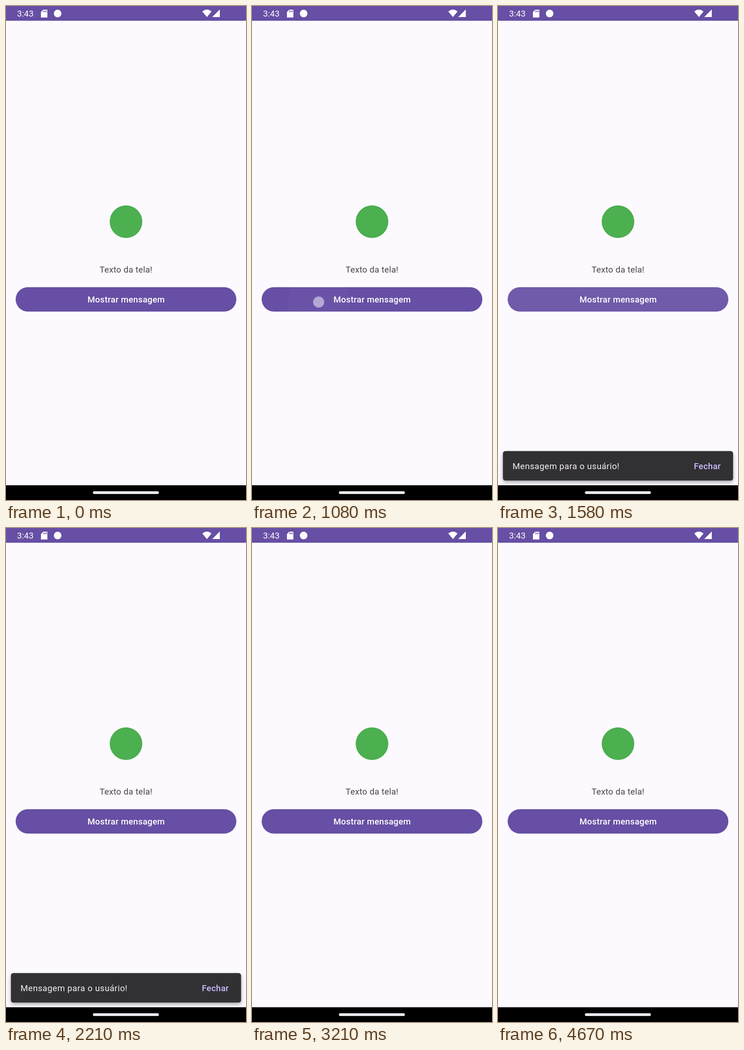
Recreate the animation shown at these times as an HTML page with a canvas. Size 522x1073 px, loop 4710 ms.

```html
<!DOCTYPE html>
<html lang="pt">
<head>
<meta charset="utf-8">
<title>Mensagem</title>
<style>
  html, body { margin: 0; width: 100%; height: 100%; overflow: hidden; background: #fdfaff; }
  canvas { display: block; width: 522px; height: 1073px; }
</style>
</head>
<body>
<canvas id="stage"></canvas>
<script>
const W = 522, H = 1073, LOOP = 4710;
const PRIMARY = '#664fa4', SURFACE = '#fdfaff', GREEN = '#4caf50';
const TAP = { x: 145, y: 643, down: 1060, up: 1165 };
const CLOSE = { x: 460, y: 1000, down: 2590, up: 2680 };
const SHOW = 1190, HIDE = 2705;

const canvas = document.getElementById('stage');
const dpr = window.devicePixelRatio || 1;
canvas.width = W * dpr;
canvas.height = H * dpr;
const ctx = canvas.getContext('2d');

const clamp = v => Math.max(0, Math.min(1, v));
const progress = (t, start, length) => clamp((t - start) / length);
const easeOut = p => 1 - (1 - p) ** 3;

function rect(x, y, w, h, color) {
  ctx.fillStyle = color;
  ctx.fillRect(x, y, w, h);
}

function pill(x, y, w, h, r, color) {
  ctx.beginPath();
  ctx.roundRect(x, y, w, h, r);
  ctx.fillStyle = color;
  ctx.fill();
}

function disc(x, y, r, color) {
  ctx.beginPath();
  ctx.arc(x, y, r, 0, Math.PI * 2);
  ctx.fillStyle = color;
  ctx.fill();
}

function polygon(points, color) {
  ctx.beginPath();
  points.forEach(([x, y]) => ctx.lineTo(x, y));
  ctx.closePath();
  ctx.fillStyle = color;
  ctx.fill();
}

function label(text, x, y, { color, weight = 400, spacing = 0, align = 'left' }) {
  ctx.font = `${weight} 18.67px Roboto, "Noto Sans", sans-serif`;
  ctx.letterSpacing = spacing + 'px';
  ctx.textAlign = align;
  ctx.fillStyle = color;
  ctx.fillText(text, x, y);
}

function statusBar() {
  rect(0, 0, W, 32, PRIMARY);
  label('3:43', 24, 23, { color: '#fff' });

  // Memory card
  polygon([[81, 8], [90, 8], [90, 25], [76, 25], [76, 13]], '#fff');
  for (let i = 0; i < 3; i++) rect(81 + i * 3, 10, 1.6, 3.5, PRIMARY);

  disc(112.3, 16.3, 8.3, '#fff');

  // Wi-Fi and signal
  ctx.beginPath();
  ctx.moveTo(437, 24);
  ctx.lineTo(427, 12);
  ctx.quadraticCurveTo(437, 3.5, 447, 12);
  ctx.closePath();
  ctx.fill();
  polygon([[465, 7.5], [465, 24], [448.5, 24]], '#fff');
}

function button(t) {
  pill(21, 610.7, 480, 53, 26.5, PRIMARY);
  const grow = progress(t, TAP.down, 450);
  const fade = 1 - progress(t, TAP.down + 450, 375);
  if (grow > 0 && fade > 0) {
    ctx.save();
    ctx.clip();
    ctx.globalAlpha = 0.08 * fade * progress(t, TAP.down, 75);
    disc(TAP.x, TAP.y, 20 + 360 * easeOut(grow), '#fff');
    ctx.restore();
  }
  label('Mostrar mensagem', 261.4, 644, { color: '#fff', weight: 500, spacing: 0.3, align: 'center' });
}

function snackbar(t) {
  const alpha = progress(t, SHOW, 150) * (1 - progress(t, HIDE, 75));
  if (!alpha) return;
  const scale = 0.8 + 0.2 * easeOut(progress(t, SHOW, 150));
  ctx.save();
  ctx.translate(261, 999);
  ctx.scale(scale, scale);
  ctx.translate(-261, -999);
  ctx.globalAlpha = alpha;
  ctx.shadowColor = 'rgba(0, 0, 0, 0.32)';
  ctx.shadowBlur = 9 * dpr;
  ctx.shadowOffsetY = 4 * dpr;
  pill(10.7, 966.7, 500.6, 64, 5.3, '#313033');
  ctx.shadowColor = 'transparent';
  ctx.globalAlpha = Math.sqrt(alpha);
  label('Mensagem para o usuário!', 31.5, 1006, { color: '#f4eff4', spacing: 0.5 });
  label('Fechar', 426, 1006, { color: '#d0bcff', weight: 500, spacing: 0.3 });
  ctx.restore();
}

function touch(t, { x, y, down, up }) {
  if (t < down) return;
  const alpha = 1 - progress(t, up, 150);
  if (!alpha) return;
  ctx.save();
  ctx.globalAlpha = alpha;
  disc(x, y, 12, 'rgba(255, 250, 255, 0.5)');
  ctx.beginPath();
  ctx.arc(x, y, 11.3, 0, Math.PI * 2);
  ctx.strokeStyle = 'rgba(150, 175, 240, 0.55)';
  ctx.lineWidth = 1.4;
  ctx.stroke();
  ctx.restore();
}

function draw(t) {
  ctx.setTransform(dpr, 0, 0, dpr, 0, 0);
  rect(0, 0, W, H, SURFACE);
  statusBar();
  disc(261, 468.5, 35.5, GREEN);
  label('Texto da tela!', 261, 578.5, { color: '#49454f', spacing: 0.25, align: 'center' });
  button(t);
  snackbar(t);
  rect(0, 1041, W, 32, '#000');
  pill(189, 1054, 143.5, 6, 3, '#ece8ee');
  touch(t, TAP);
  touch(t, CLOSE);
}

const start = performance.now();
function tick() {
  draw((performance.now() - start) % LOOP);
  requestAnimationFrame(tick);
}
tick();
</script>
</body>
</html>
```
